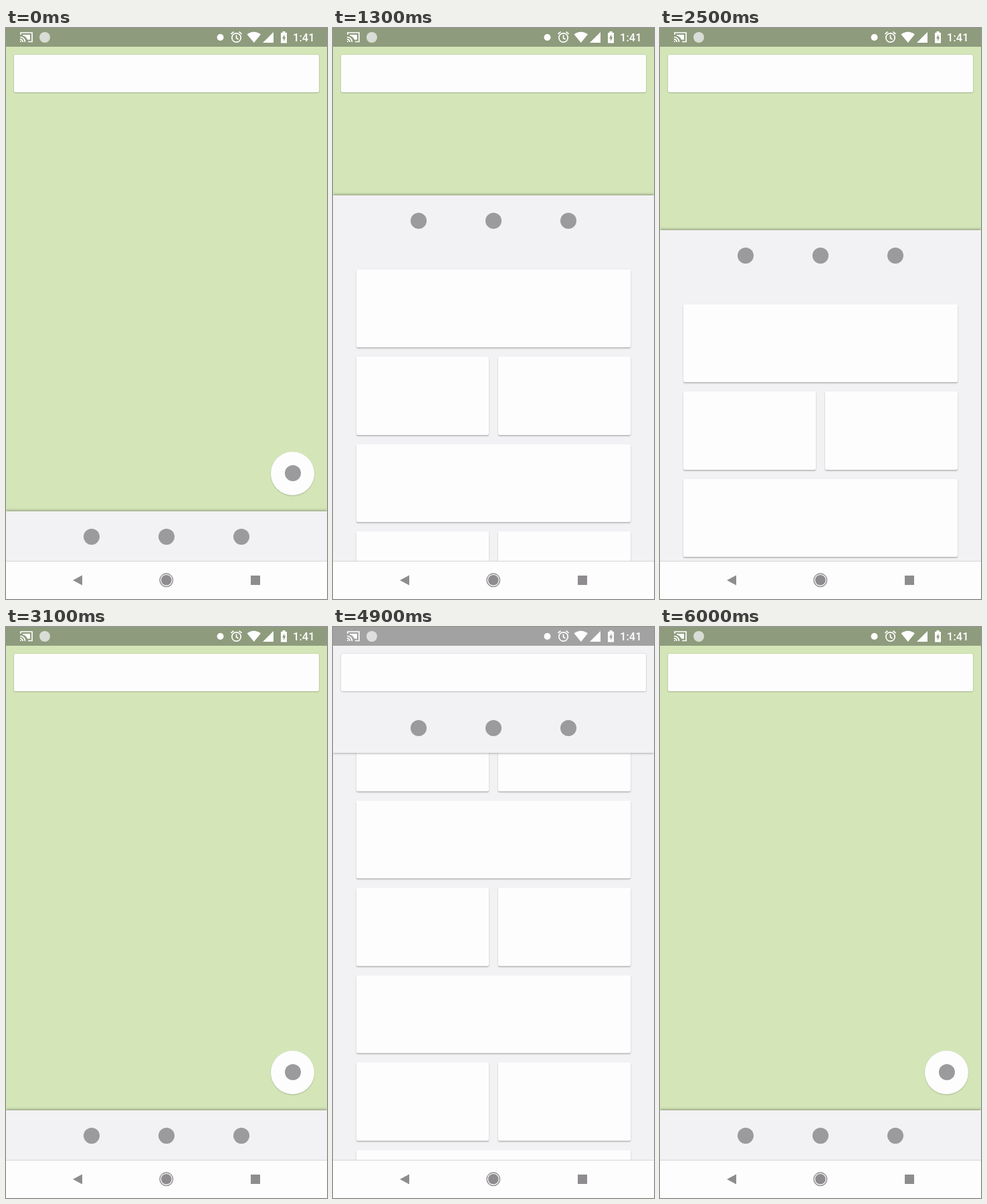
Recreate the animation shown at these times as an HTML page. Size 480 px wide and 853 px high, loop 6.6 s.

```html
<!DOCTYPE html>
<html lang="en">
<head>
<meta charset="utf-8">
<title>Bottom sheet</title>
<style>
  :root { --sheet: #f2f1f3; --card: #fefdfe; --icon: #9b9a9c; }
  html, body { margin: 0; width: 100%; height: 100%; overflow: hidden; }
  .stage { position: relative; width: 480px; height: 853px; overflow: hidden; background: #d4e6b8; }
  .stage > * { position: absolute; }
  .dot { position: absolute; width: 24px; height: 24px; border-radius: 50%; background: var(--icon); }
  .fab {
    left: 396px; top: 632.5px; width: 65px; height: 65px; border-radius: 50%;
    background: var(--card); box-shadow: 0 1px 2px rgba(0, 0, 0, .2);
  }
  .fab .dot { left: 20.5px; top: 20.5px; }
  .sheet {
    left: 0; top: 722px; width: 480px; height: 740px; overflow: hidden;
    background: var(--sheet); box-shadow: 0 -1px 4px rgba(0, 0, 0, .38);
  }
  .cards {
    position: absolute; left: 35px; top: 110.5px; width: 410px;
    display: grid; grid-template-columns: 1fr 1fr; grid-auto-rows: 116.5px; gap: 14px;
  }
  .card { background: var(--card); border-radius: 2px; box-shadow: 0 1.5px 2px rgba(0, 0, 0, .28); }
  .card:nth-child(3n + 1) { grid-column: span 2; }
  .header { position: absolute; inset: 0 0 auto; height: 75px; background: var(--sheet); }
  .header .dot { top: 26px; }
  .header .dot:nth-child(1) { left: 116px; }
  .header .dot:nth-child(2) { left: 228px; }
  .header .dot:nth-child(3) { left: 340px; }
  .cover { left: 0; top: 0; width: 480px; height: 113px; background: var(--sheet); }
  .search {
    left: 12px; top: 40px; width: 456px; height: 55.5px; border-radius: 2px;
    background: var(--card); box-shadow: 0 .5px 2px rgba(0, 0, 0, .35);
  }
  .status { left: 0; top: 0; background: rgba(0, 0, 0, .33); }
  .status text { font: 500 16.5px Roboto, sans-serif; }
  .nav { left: 0; top: 796px; background: var(--card); }
</style>
</head>
<body>
<div class="stage">
  <div class="fab"><i class="dot"></i></div>
  <div class="sheet">
    <div class="cards"></div>
    <div class="header"><i class="dot"></i><i class="dot"></i><i class="dot"></i></div>
  </div>
  <div class="cover"></div>
  <div class="search"></div>

  <svg class="status" width="480" height="28" fill="#fff">
    <g fill="none" stroke="#fff" stroke-width="1.7">
      <path d="M22 10V7h17v13.500h-6M21 13.500a7.500 7.500 0 0 1 7.500 7.500M21 16.800a4.200 4.200 0 0 1 4.200 4.200"/>
      <circle cx="344.500" cy="14.500" r="6.700"/>
      <path d="M344.500 10.500v4.500l3 2M336.500 9l4-3.300M352.500 9l-4-3.300"/>
    </g>
    <path d="M21 19a2 2 0 0 1 2 2h-2zM25 10h11v7.500h-4q-2-5-7-6z"/>
    <circle cx="58" cy="14" r="8" opacity=".65"/>
    <circle cx="57" cy="13" r="6.300" fill="#ddd" opacity=".45"/>
    <circle cx="320.500" cy="14" r="5"/>
    <path d="M360.500 9.500q10-7.500 20.500 0L370.800 22zM384 22l16-16v16z"/>
    <path fill-rule="evenodd" d="M411 7h2.500V5h4v2h2.500v15.500h-9zM416.300 9.500l-3.300 6h2v4.500l3.300-6.500h-2z"/>
    <text x="429" y="20">1:41</text>
  </svg>

  <svg class="nav" width="480" height="57" fill="#8e8c8e">
    <path d="M0 0h480v1H0z" fill="#d4d3d5"/>
    <path d="M100 29l14-7.500v15zM366 22h14v14h-14z"/>
    <circle cx="239.800" cy="28.800" r="7.800"/>
    <circle cx="239.800" cy="28.800" r="9.800" fill="none" stroke="#8e8c8e" stroke-width="1.400"/>
  </svg>
</div>
<script>
  const LOOP = 6600, STEP = 100;
  const TRAVEL = 609;      // distance from collapsed to fully expanded
  const FAB_RATIO = 0.762; // the button trails the sheet

  const $ = selector => document.querySelector(selector);
  const [fab, sheet, cards, header, cover] =
    ['.fab', '.sheet', '.cards', '.header', '.cover'].map($);
  cards.innerHTML = '<div class="card"></div>'.repeat(18);

  const easeIn = power => u => u ** power;
  const easeOut = power => u => 1 - (1 - u) ** power;
  const sine = u => (1 - Math.cos(Math.PI * u)) / 2;
  const clamp = v => Math.min(1, Math.max(0, v));

  // Drags and flings: start, end, distance at the end, easing.
  const moves = [
    [900, 1300, 472, easeIn(1.4)],
    [1300, 1900, 660.5, easeOut(2.4)],
    [2000, 2500, 420, sine],
    [2800, 3100, 0, sine],
    [3600, 4300, 307, sine],
    [4500, 4900, 834.5, easeIn(1.3)],
    [4900, 5200, 1000, easeOut(2)],
    [5200, 6000, 0, sine]
  ];

  function distanceAt(time) {
    let distance = 0;
    for (const [start, end, goal, ease] of moves) {
      if (time <= start) break;
      distance += (goal - distance) * ease(clamp((time - start) / (end - start)));
    }
    return distance;
  }

  const shift = (el, y) => { el.style.transform = `translateY(${y}px)`; };

  function draw(now) {
    const time = Math.floor(now % LOOP / STEP) * STEP;
    const distance = distanceAt(time);
    const lift = Math.min(distance, TRAVEL);
    const scroll = distance - lift;
    shift(sheet, -lift);
    shift(fab, -lift * FAB_RATIO);
    shift(cards, -scroll);
    cover.style.opacity = clamp((lift - 530) / (TRAVEL - 530));
    header.style.boxShadow = `0 1px 3px rgba(0, 0, 0, ${0.3 * clamp(scroll / 15)})`;
  }

  const origin = performance.now();
  function tick() {
    draw(performance.now() - origin);
    requestAnimationFrame(tick);
  }
  tick();
</script>
</body>
</html>
```
